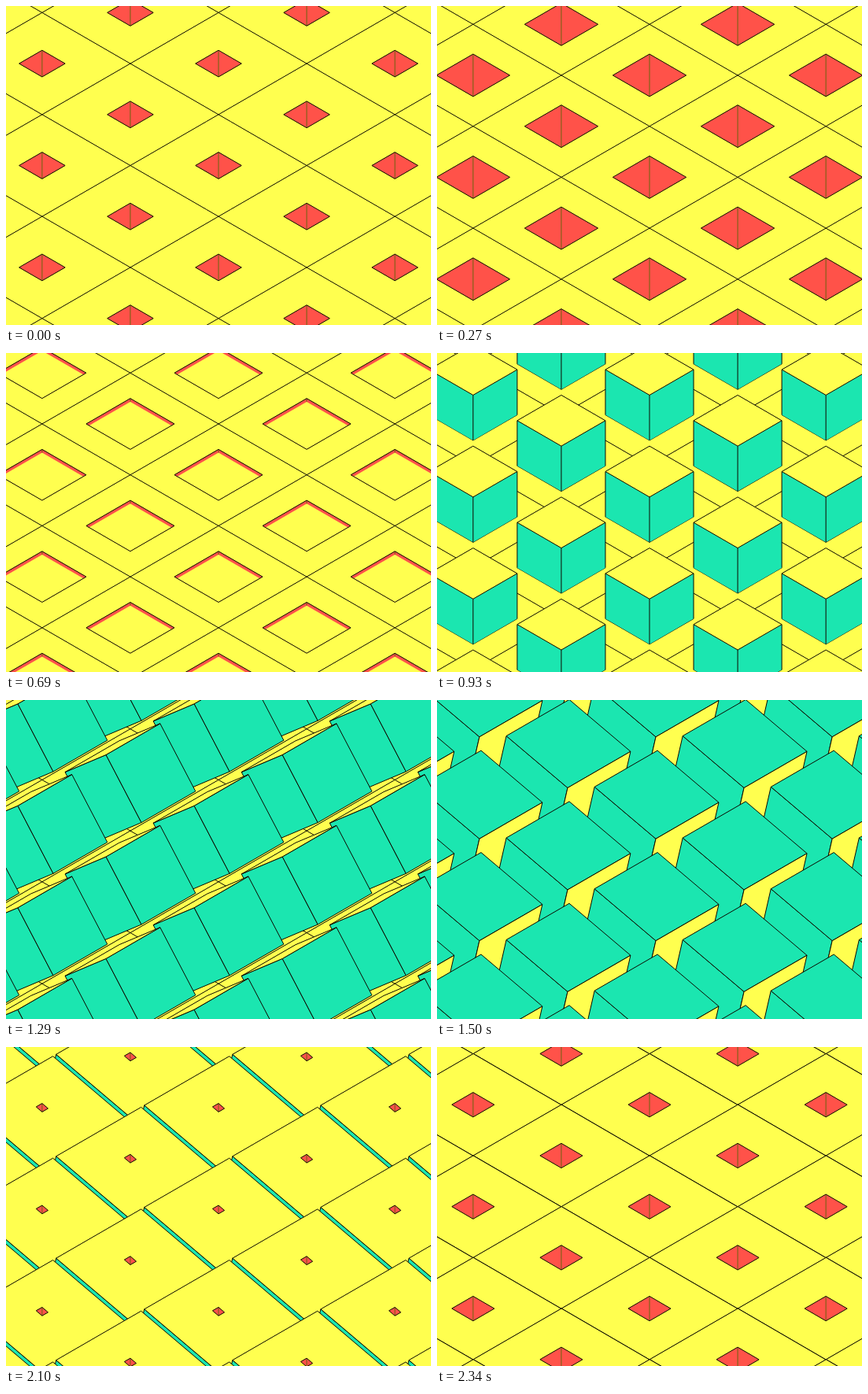
Animation of 540 by 405 pixels, one loop 2370 ms. Source, as an HTML page with a canvas:

```html
<!DOCTYPE html>
<html>
<head>
<meta charset="utf-8">
<style>
html, body { margin: 0; width: 100%; height: 100%; overflow: hidden; background: #ffff4f; }
canvas { display: block; }
</style>
</head>
<body>
<canvas id="stage" width="540" height="405"></canvas>
<script>
const ctx = document.getElementById('stage').getContext('2d');
const W = 540, H = 405, LOOP = 2370, STEP = 30;
const YELLOW = '#ffff4f', RED = '#ff5249', TEAL = '#1be6b0', INK = '#0c0a00', SEAM = '#6b6410';
const T = 129.4, COS = Math.sqrt(3) / 2;

const clamp = v => Math.min(1, Math.max(0, v));
const smooth = v => v * v * (3 - 2 * v);

// Isometric projection: x runs right-down, y right-up, z up.
const iso = (o, x, y, z) => [o[0] + COS * (x + y), o[1] + (x - y) / 2 - z];

function trace(points, close) {
  ctx.beginPath();
  points.forEach(p => ctx.lineTo(p[0], p[1]));
  if (close) ctx.closePath();
}

function line(points, color = INK) {
  trace(points, false);
  ctx.strokeStyle = color;
  ctx.stroke();
}

function face(points, fill, outlined = true) {
  trace(points, true);
  ctx.fillStyle = fill;
  ctx.fill();
  if (outlined) {
    ctx.strokeStyle = INK;
    ctx.stroke();
  }
}

// Corners in the order back, right, front, left.
function rhombus(o, size, z = 0, slope = 0) {
  const h = size / 2;
  return [[-h, h], [h, h], [h, -h], [-h, -h]].map(([x, y]) => iso(o, x, y, z - slope * x));
}

// Visits every lattice cell from back to front.
function eachCell(offset, draw) {
  for (let row = -8; row <= 8; row++) {
    for (let col = -4; col <= 4; col++) {
      if ((row + col) % 2) continue;
      draw([W / 2 + col * COS * T, H / 2 + row * T / 2 + offset % T]);
    }
  }
}

function grid(offset) {
  ctx.fillStyle = YELLOW;
  ctx.fillRect(0, 0, W, H);
  const reach = 10 * T;
  for (let k = -8; k <= 8; k++) {
    const o = [W / 2, H / 2 + offset % T + (k + 0.5) * T];
    line([iso(o, -reach, 0, 0), iso(o, reach, 0, 0)]);
    line([iso(o, 0, -reach, 0), iso(o, 0, reach, 0)]);
  }
}

function pit(o, size, depth, slope = 0) {
  if (size < 0.5) return;
  const rim = rhombus(o, size, 0, slope);
  const back = rim[0], front = rim[2];
  face(rim, RED, false);
  if (depth < size + T / 2) {
    ctx.save();
    trace(rim, true);
    ctx.clip();
    face(rhombus(o, T / 2, -depth), YELLOW, false);
    ctx.restore();
  }
  line([back, [back[0], Math.min(front[1], back[1] + depth)]], SEAM);
  line([...rim, back]);
}

// A half-size block sticking out of the ground.
function risingBlock(o, height) {
  const top = rhombus(o, T / 2, height);
  const [, right, front, left] = top;
  const down = p => [p[0], p[1] + height];
  face([left, front, down(front), down(left)], TEAL, false);
  face([front, right, down(right), down(front)], TEAL, false);
  [left, front, right].forEach(p => line([p, down(p)]));
  face(top, YELLOW);
}

// A cube turned about the y axis through its centre.
function rollingCube(o, size, angle) {
  const h = size / 2;
  const at = (n, d, along, y) => iso(o, n[0] * h + d[0] * along, y, n[1] * h + d[1] * along);
  const sides = [0, 1, 2, 3].map(k => {
    const a = angle + k * Math.PI / 2;
    const n = [Math.cos(a), Math.sin(a)];
    return { n, d: [n[1], -n[0]], fill: k % 2 ? YELLOW : TEAL };
  });
  face(sides.map(({ n, d }) => at(n, d, h, -h)), TEAL);
  for (const { n, d, fill } of sides) {
    if (n[0] + n[1] <= 0.001) continue;
    // Hide the part that runs inside the cube behind.
    const meets = n[0] < 0 && -n[0] * T < size;
    const from = meets ? Math.max(-h, h - T * d[0]) : -h;
    face([at(n, d, from, -h), at(n, d, from, h), at(n, d, h, h), at(n, d, h, -h)], fill);
  }
}

function pitSize(p) {
  const x = clamp((p - 0.85) / 0.366);
  return T / 2 * (1 - Math.pow(1 - x, 1.4));
}

function draw(time) {
  const p = time / LOOP;
  const s = smooth(p);
  const sway = 2.6 * Math.sin(Math.PI * p);
  const ground = 3 * T * s + sway;
  const centre = T - T / 2 * s + sway;
  const rise = 3.5 * T * s - 0.75 * T; // block top above the ground
  const free = 1.25 / 3.5;             // progress at which the block leaves the ground

  ctx.lineWidth = 1;
  ctx.lineJoin = 'round';
  grid(ground);
  eachCell(ground, o => pit(o, pitSize(p + 1), rise < 0 ? -rise : T));

  if (s < free) {
    if (rise > 0) eachCell(ground, o => risingBlock(o, rise));
    return;
  }

  const turn = Math.pow(clamp((s - free) / (1 - free)), 1.32);
  const size = T / 2 * (1 + turn);
  const tilt = Math.PI * (1 - turn);
  eachCell(centre, o => rollingCube(o, size, Math.PI * turn));
  if (p > 0.85) {
    const lift = size / 2 / Math.cos(tilt);
    eachCell(centre, o => pit([o[0], o[1] - lift], pitSize(p), T, Math.tan(tilt)));
  }
}

const start = performance.now();
function tick() {
  const t = (performance.now() - start) % LOOP;
  draw(Math.floor(t / STEP) * STEP);
  requestAnimationFrame(tick);
}
tick();
</script>
</body>
</html>
```
